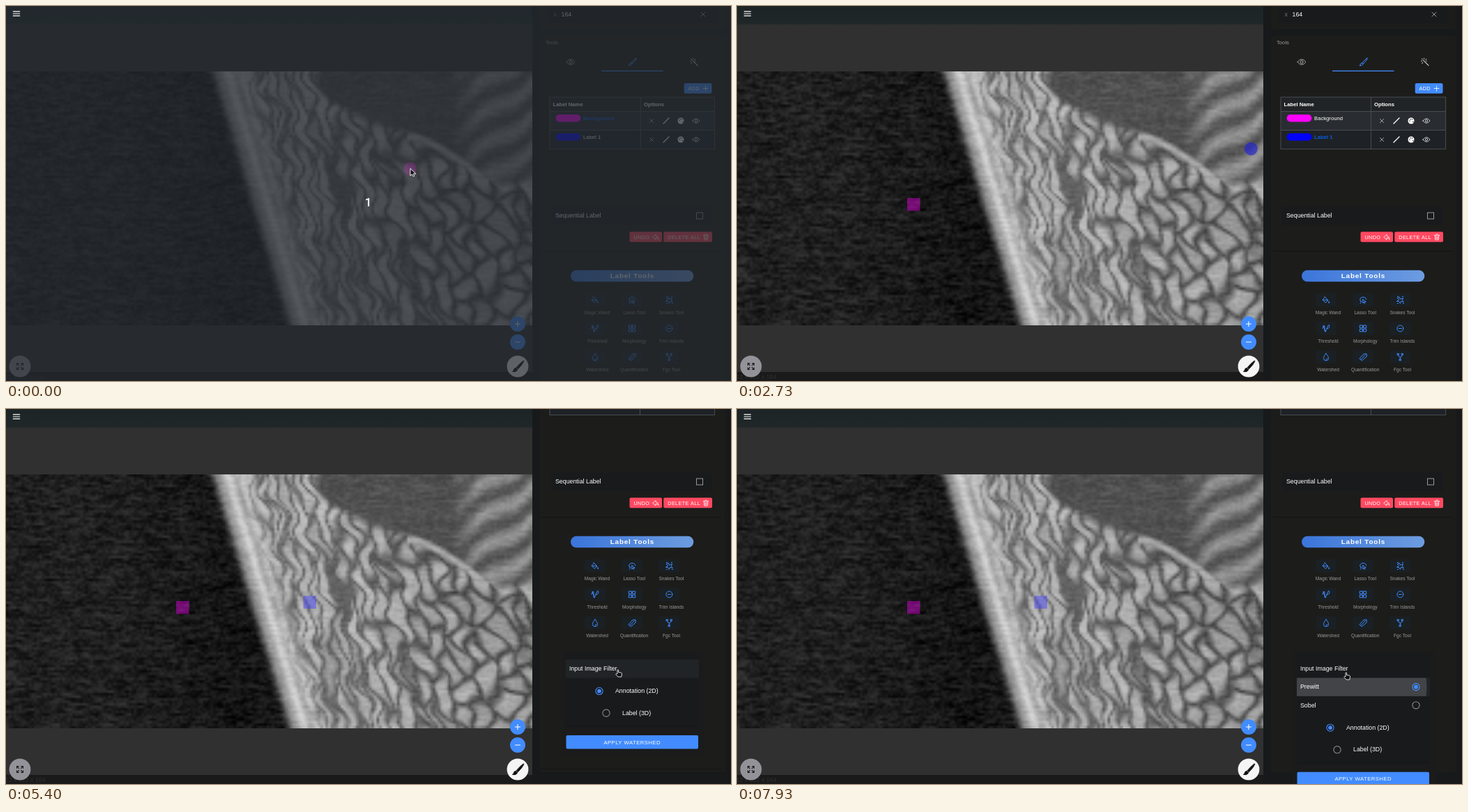
These frames come from a looping animation (1040 by 539 pixels, 8000 ms). An HTML page with a canvas:

```html
<!DOCTYPE html>
<html lang="en">
<head>
<meta charset="utf-8">
<title>Label tools</title>
<style>
html, body { margin: 0; width: 100%; height: 100%; overflow: hidden; background: #1b1b1b; }
canvas { display: block; }
</style>
</head>
<body>
<canvas id="stage" width="1040" height="539"></canvas>
<script>
const ctx = document.getElementById('stage').getContext('2d');
const LOOP = 8000, STEP = 1000 / 15;
const SANS = '"Liberation Sans", Arial, sans-serif';
const BLUE = '#428cff', RED = '#ff4961', WHITE = '#fff', CARD = '#191a1c';
const clamp = (v, a = 0, b = 1) => Math.min(b, Math.max(a, v));
const mix = (a, b, k) => a + (b - a) * k;
const ramp = (t, a, b) => clamp((t - a) / (b - a));
const ease = k => k * k * (3 - 2 * k);

// Piecewise linear track: rows of [time, ...values]
function track(rows, t) {
  let i = 1;
  while (i < rows.length - 1 && rows[i][0] < t) i++;
  const a = rows[i - 1], b = rows[i], k = ramp(t, a[0], b[0]);
  return a.slice(1).map((v, j) => mix(v, b[j + 1], k));
}

const POINTER = [
  [0, 580, 234], [70, 582, 231], [400, 582, 231], [533, 545, 231], [667, 410, 252],
  [800, 290, 280], [933, 253, 285], [1133, 253, 285], [1333, 283, 278], [1533, 362, 259],
  [1667, 540, 235], [1800, 722, 214], [2000, 818, 205], [2267, 838, 190], [2467, 838, 190],
  [2600, 800, 198], [2733, 738, 205], [2867, 470, 299], [2933, 479, 307],
  [3133, 440, 282], [3333, 436, 278], [3467, 436, 278], [3667, 520, 300],
  [3900, 770, 365], [4133, 881, 405], [4333, 881, 405], [5067, 868, 375],
  [5333, 868, 375], [5400, 874, 374], [5600, 874, 374], [5867, 872, 379], [6200, 872, 379],
  [6400, 868, 410], [6533, 868, 410], [6667, 867, 383], [7067, 863, 396],
  [7133, 863, 396], [7533, 870, 378], [8000, 870, 378]
];
const SCROLL = [[0, 0], [4200, 0], [4333, 61.3], [4533, 112], [4733, 155], [5067, 197], [8000, 197]];

function text(s, x, y, size, color, o = {}) {
  ctx.font = `${o.weight || 400} ${size}px ${o.font || SANS}`;
  ctx.letterSpacing = (o.gap || 0) + 'px';
  ctx.textAlign = o.align || 'left';
  ctx.textBaseline = 'alphabetic';
  ctx.fillStyle = color;
  ctx.fillText(s, x, y + size * 0.36);
}
function box(x, y, w, h, color, r = 0) {
  ctx.fillStyle = color;
  ctx.beginPath();
  ctx.roundRect(x, y, w, h, r);
  ctx.fill();
}
function disc(x, y, r, color) {
  ctx.fillStyle = color;
  ctx.beginPath();
  ctx.arc(x, y, Math.max(0, r), 0, 7);
  ctx.fill();
}
function clip(x, y, w, h, paint) {
  ctx.save();
  ctx.beginPath();
  ctx.rect(x, y, w, h);
  ctx.clip();
  paint();
  ctx.restore();
}
function icon(d, x, y, color, width = 1, fill, scale = 1) {
  ctx.save();
  ctx.translate(x, y);
  ctx.scale(scale, scale);
  const p = new Path2D(d);
  if (fill) { ctx.fillStyle = fill; ctx.fill(p); }
  ctx.strokeStyle = color;
  ctx.lineWidth = width;
  ctx.lineJoin = ctx.lineCap = 'round';
  ctx.stroke(p);
  ctx.restore();
}

const ICON = {
  eye: 'M-6 0Q0-8 6 0Q0 8-6 0ZM2 0A2 2 0 1 1-2 0A2 2 0 1 1 2 0',
  brush: 'M5.2-5.6Q1.5-2.8-1.7 1.2L-.1 2.6Q4-1.2 5.7-4.8ZM-2.2 1.6Q-4 1.6-4.2 3.4Q-4.4 4.8-5.6 5Q-2 6.2-.5 3.2Z',
  wand: 'M-1-1L5 5M-2.6-2.6L-1-1M-5.4-1.4H-4.2M-1.4-5.4V-4.2M1-3.4L1.8-4.2M-3.4 1L-4.2 1.8M-4.6-4.6L-3.8-3.8M1.4-1.4H2',
  cross: 'M-3-3L3 3M3-3L-3 3',
  line: 'M-4 4L4-4',
  plus: 'M-3.5 0H3.5M0-3.5V3.5',
  undo: 'M-4 0L0-3.5V-1.5Q4-1 4 3.5Q2.5 1 0 1.3V3.5Z',
  bin: 'M-3.5-2.5H3.5M-2.8-2.5L-2.2 4H2.2L2.8-2.5M-1-4H1M-.9-.7V2.5M.9-.7V2.5',
  expand: 'M-4.5-1.8V-4.5H-1.8M1.8-4.5H4.5V-1.8M4.5 1.8V4.5H1.8M-1.8 4.5H-4.5V1.8M-4.5-4.5L-1.5-1.5M4.5-4.5L1.5-1.5M4.5 4.5L1.5 1.5M-4.5 4.5L-1.5 1.5',
  arrow: 'M0 0V10L2.5 7.8L4.2 11L5.9 10.1L4.3 7.1H7.5Z',
  hand: 'M3 6.5V1.2Q3.8 0 4.6 1.2V4.4L8.5 5Q9.8 5.4 9.5 7L8.7 11H4L.8 7.6Q.8 6.2 2 6.4Z'
};
const TOOLS = [
  ['Magic Wand', 'M-1-3.6L3 .6L-.8 4L-4.8 0ZM-1-3.6L-2.4-5M-4 .2H2.6M4.2 2.4Q5.4 4.2 4.2 4.6Q3 4.2 4.2 2.4'],
  ['Lasso Tool', 'M-3.8 1.8A4.6 3.8 0 1 1 4.6-.6M-3.8 1.8Q-1.8 1-2.6 3Q-3.4 4-4 5M-.4-.8V4.6L1.2 3L2.4 5.4M-.4-.8L4 2.8L1.2 3'],
  ['Snakes Tool', 'M-4-3L-1-4L0-1L4-3L3 1L5 3L1 2L0 5L-2 2L-5 2L-2 0ZM-4-5H-3M3-5H4M4 5H5M-4 5H-3'],
  ['Threshold', 'M-5 0Q-2-9-2 0Q-2 8 0 3L2-2Q4-8 5-3Q4 1 1 0M-4-4L-1 4'],
  ['Morphology', 'M-4.5-4.5H-.8V-.8H-4.5ZM.8-4.5H4.5V-.8H.8ZM-4.5.8H-.8V4.5H-4.5ZM.8.8H4.5V4.5H.8Z'],
  ['Trim Islands', 'M4.5 0A4.5 4.5 0 1 1-4.5 0A4.5 4.5 0 1 1 4.5 0M-2 0H2'],
  ['Watershed', 'M0-5Q4 0 3.5 2A3.5 3.2 0 0 1-3.5 2Q-4 0 0-5ZM1.8 2Q1.5 3.4 0 3.5'],
  ['Quantification', 'M-5 2L1-4.5H5V-.5L-1.5 5ZM-3 3.5L3-3'],
  ['Fgc Tool', 'M-3-3Q-3 0 0 0Q3 0 3-3M0 0V3M-4-5H-2V-3H-4ZM2-5H4V-3H2ZM-1 3H1V5H-1Z']
];

// Soft greyscale tissue: dark field, bright rim, blurred fibres that turn into cells
function makeScan() {
  const W = 206, H = 100, c = document.createElement('canvas');
  c.width = W; c.height = H;
  const g = c.getContext('2d'), im = g.createImageData(W, H);
  let seed = 11, last = 0;
  const rnd = () => (seed = (seed * 16807) % 2147483647) / 2147483647;
  const grain = () => (last = last * 0.55 + rnd() - 0.5);
  const cells = [];
  for (let y = -40; y < 420; y += 36)
    for (let x = 280; x < 800; x += 30)
      cells.push([x + rnd() * 30, y + rnd() * 36, rnd()]);

  function tissueAt(x, y, d) {
    const round = ramp(d, 110, 300), w = mix(14, 28, round), h = mix(85, 36, round);
    const wx = x + 5 * Math.sin(y / 13 + x / 31) + 3 * Math.sin(y / 6 - x / 17);
    const wy = y + 5 * Math.sin(x / 12 + y / 40);
    let a = 1e9, b = 1e9, tone = 0;
    for (const s of cells) {
      const dy = wy - s[1], dx = wx - s[0] - dy * 0.26;
      const q = (dx / w) ** 2 + (dy / h) ** 2;
      if (q < a) { b = a; a = q; tone = s[2]; } else if (q < b) b = q;
    }
    const edge = ease(ramp(Math.sqrt(b) - Math.sqrt(a), -0.12, 0.5));
    let v = mix(mix(88, 62, round), mix(165, 150, round) + tone * 26, edge);
    v = mix(v, 205 - 30 * Math.sin(d / 6) ** 2, 1 - ramp(d, 22, 58));
    const top = x < 580 ? 92 * Math.sqrt(ramp(x, 435, 580)) : mix(92, 160, ramp(x, 580, 705));
    const above = ramp(top - y, -6, 8) * ramp(x, 432, 450);
    const streak = 116 + 30 * Math.sin((x + y * 1.5 + 9 * Math.sin(x / 15)) / 11);
    v = mix(v, mix(80, streak, ramp(x, 635, 675)), above);
    const arch = Math.abs(y - (92 + 66 * ramp(x, 580, 690) ** 1.4));
    if (x > 572 && x < 690) v = mix(v, 168, 1 - ramp(arch, 2, 9));
    return v;
  }

  for (let j = 0; j < H; j++) for (let i = 0; i < W; i++) {
    const x = i * 3.665, y = j * 3.65, d = x - 298 - 0.304 * y, n = grain();
    let v = 32 - 11 * ramp(x, 150, 330) + n * 26;
    if (d > -14) v = mix(v, tissueAt(x, y, d) + n * 18, ease(ramp(d, -14, 14)));
    const p = (j * W + i) * 4;
    im.data.fill(v, p, p + 3);
    im.data[p + 3] = 255;
  }
  g.putImageData(im, 0, 0);
  return c;
}
const scan = makeScan();

function viewer(t) {
  box(0, 0, 755, 539, '#303030');
  const head = ctx.createLinearGradient(0, 0, 0, 28);
  head.addColorStop(0, '#1d2425');
  head.addColorStop(0.9, '#1f2728');
  head.addColorStop(1, '#303030');
  box(0, 0, 755, 28, head);
  ctx.drawImage(scan, 0, 94, 755, 365);
  box(0, 526, 755, 13, '#1b1a1a');
  text('512 x 512 x 164', -6, 532.5, 8.8, '#303030');
  if (t >= 900) box(244, 276, 18.5, 18.5, 'rgba(255,0,255,.4)');
  if (t >= 3300) box(426.5, 268.5, 18.5, 18.5, 'rgba(60,60,255,.45)');
  disc(734, 457, 11, BLUE);
  icon(ICON.plus, 734, 457, WHITE, 1.1);
  disc(734, 483, 11, BLUE);
  icon('M-3.5 0H3.5', 734, 483, WHITE, 1.1);
  disc(734, 518, 15.4, '#f4f5f4');
  icon(ICON.brush, 734.5, 518, '#111', 0.6, '#111', 1.45);
  disc(20, 518, 15.4, '#929298');
  icon(ICON.expand, 20, 518, '#1a1a1a', 1.1);
}

function tableRow(y, name, color, on, shift) {
  box(788.7, y - 9, 35.6, 10.4, color, 5);
  text(name, 828, y - 3.3, 7.7, on ? '#0b5ae0' : WHITE, { weight: on ? 700 : 400 });
  icon(ICON.cross, 926 - shift, y, '#ddd', 0.8, null, 0.85);
  icon(ICON.line, 947 - shift, y, WHITE, 1.3);
  disc(968 - shift, y, 4.5, WHITE);
  for (const [dx, dy] of [[-2, 0], [-1, -2.3], [1.5, -2], [2.8, 1.6]])
    disc(968 - shift + dx, y + dy, 0.8, '#222');
  icon(ICON.eye, 990 - shift, y, '#ddd', 1, null, 0.85);
}

function radio(x, y, k) {
  ctx.strokeStyle = k > 0.5 ? BLUE : '#8a8a8a';
  ctx.lineWidth = 1.1;
  ctx.beginPath();
  ctx.arc(x, y, 5.1, 0, 7);
  ctx.stroke();
  if (k > 0) disc(x, y, 2.9 * k, k > 0.5 ? BLUE : '#8a8a8a');
}

function ripple(y, x, r, alpha) {
  clip(803, y, 191, 26.4, () => disc(x, y + 13, r, `rgba(72,72,75,${alpha})`));
}

function filterCard(t, pos) {
  const open = ease(ramp(t, 5520, 5867)), extra = 52.7 * open;
  const hot = pos[1] + 9 + 197;
  const hover = y => {
    if (t >= 5390 && hot >= y && hot < y + 26.4) box(803, y, 191, 26.4, '#202426');
  };
  const sobel = ramp(t, 6420, 6600) * (1 - ramp(t, 7750, 7950));
  const prewitt = t < 6600 ? 1 - ramp(t, 6420, 6600) : ramp(t, 7730, 7900);
  box(797, 545, 205, 151 + extra, '#1b1b1b', 3);
  box(803, 547, 191, 108 + extra, CARD);
  hover(557);
  text('Input Image Filter', 808, 570, 8.8, WHITE);
  clip(803, 583, 191, extra, () => {
    hover(583.4);
    hover(609.8);
    ripple(609.8, 873, (t - 6380) * 0.55, 0.75 * (1 - ramp(t, 6720, 7060)));
    ripple(583.4, 875, (t - 7700) * 0.49, 0.9);
    text('Prewitt', 808, 596.3, 8.8, WHITE);
    radio(974, 596.5, prewitt);
    text('Sobel', 808, 622.5, 8.8, WHITE);
    radio(974, 622.8, sobel);
  });
  text('Annotation (2D)', 874, 601.8 + extra, 8.8, WHITE);
  radio(851, 602.4 + extra, 1);
  text('Label (3D)', 884, 633.5 + extra, 8.8, WHITE);
  radio(861, 634 + extra, 0);
  box(803, 652 + extra, 191, 1, '#141414');
  box(803.5, 666 + extra, 189.5, 19.5, BLUE, 2);
  text('APPLY WATERSHED', 898.2, 675.8 + extra, 7.7, WHITE, { align: 'center', gap: 0.46 });
  box(768, 714 + extra, 258, 1, '#131313');
}

function panel(t, pos) {
  const [scroll] = track(SCROLL, t), second = t >= 2310, shift = second ? 1 : 0;
  box(755, 0, 285, 539, '#17191a');
  ctx.translate(0, -scroll);
  box(766, -20, 265, 53, '#1c1c1b', 3);
  box(776, -5, 245, 30, '#191a1b');
  text('X', 785.5, 12.3, 6.6, '#888');
  text('164', 796.5, 12, 8.8, WHITE);
  icon(ICON.cross, 1000, 12, '#aaa', 0.9);
  box(766, 43, 265, 676, '#1c1c1b', 3);
  text('Tools', 774, 52.5, 7.7, '#999');
  icon(ICON.eye, 810, 80.5, '#aaa', 1);
  icon(ICON.brush, 898.5, 80.5, BLUE, 1);
  icon(ICON.wand, 987, 80.5, '#bbb', 1.1);
  box(854, 92.8, 88.5, 1.1, BLUE);
  box(972.7, 111, 39.8, 14.8, BLUE, 2);
  text('ADD', 978.5, 118.4, 7.15, WHITE, { gap: 0.43 });
  icon(ICON.plus, 1003.5, 118.5, WHITE, 0.8);

  box(780, 131, 237, 21, '#202426');
  box(780, 152, 237, 27, '#292d31');
  box(780, 179, 237, 27, '#1e2226');
  ctx.strokeStyle = '#494d51';
  ctx.lineWidth = 1;
  ctx.strokeRect(780, 131, 236.6, 74.6);
  for (const y of [151, 178]) box(780, y, 237, 1, '#494d51');
  box(910 - shift, 131, 1, 75, '#494d51');
  text('Label Name', 784.5, 141.3, 7.7, WHITE, { weight: 700 });
  text('Options', 915 - shift, 141.3, 7.7, WHITE, { weight: 700 });
  tableRow(165, 'Background', '#f0f', !second, shift);
  tableRow(192, 'Label 1', '#00f', second, shift);

  box(782, 288, 231, 27, CARD);
  text('Sequential Label', 788, 301.3, 8.8, WHITE);
  ctx.strokeStyle = '#999';
  ctx.strokeRect(990.5, 297, 9, 9);
  box(894.5, 324.5, 46.5, 14.8, RED, 2);
  text('UNDO', 900.5, 332, 7.15, WHITE, { gap: 0.43 });
  icon(ICON.undo, 932, 332, WHITE, 0.8);
  box(943.3, 324.5, 69.7, 14.8, RED, 2);
  text('DELETE ALL', 949.3, 332, 7.15, WHITE, { gap: 0.43 });
  icon(ICON.bin, 1004, 332, WHITE, 0.8);
  box(768, 352, 258, 1, '#131313');

  const pill = ctx.createLinearGradient(810, 0, 986, 0);
  pill.addColorStop(0, '#3a75da');
  pill.addColorStop(1, '#6d9ce0');
  box(810, 379.8, 176.3, 16.5, pill, 8.2);
  text('Label Tools', 898.4, 387.8, 9.9, WHITE, { weight: 700, align: 'center', gap: 0.85 });
  TOOLS.forEach(([name, d], i) => {
    const x = 845 + (i % 3) * 53.2, y = 422.5 + Math.floor(i / 3) * 41;
    box(x - 15, y - 9.5, 30, 19, '#1a2023', 3);
    icon(d, x, y, BLUE, 1);
    text(name, x + 3, y + 18, 6.6, '#9a9a9a', { align: 'center' });
  });
  filterCard(t, pos);
}

function pointer(t, [x, y]) {
  const onScan = t >= 60 && x < 755;
  if (t < 60 || onScan) {
    const color = t < 2310 ? `rgba(255,40,240,${t < 60 ? 0.2 : 0.6})` : 'rgba(30,30,220,.62)';
    clip(0, 0, 755, 539, () => disc(x, y, 9.4, color));
  }
  if (onScan) return;
  const hand = t >= 5130 || (t > 2130 && t < 2560);
  icon(hand ? ICON.hand : ICON.arrow, x, y, hand ? '#eee' : WHITE, 0.9, '#111');
}

function draw(now) {
  const t = Math.floor(((now % LOOP) + 5) / STEP) * STEP;
  const pos = track(POINTER, t);
  viewer(t);
  clip(755, 0, 285, 539, () => panel(t, pos));
  if (t < 60) {
    box(0, 0, 1040, 539, 'rgba(37,42,48,.72)');
    text('1', 519.5, 282, 17, WHITE, { font: 'Roboto, sans-serif', weight: 500, align: 'center' });
  }
  icon('M-4.7-3.2H4.7M-4.7 0H4.7M-4.7 3.2H4.7', 15, 11, WHITE, 1.2);
  pointer(t, pos);
}

const start = performance.now();
function frame() {
  draw(performance.now() - start);
  requestAnimationFrame(frame);
}
frame();
</script>
</body>
</html>
```
